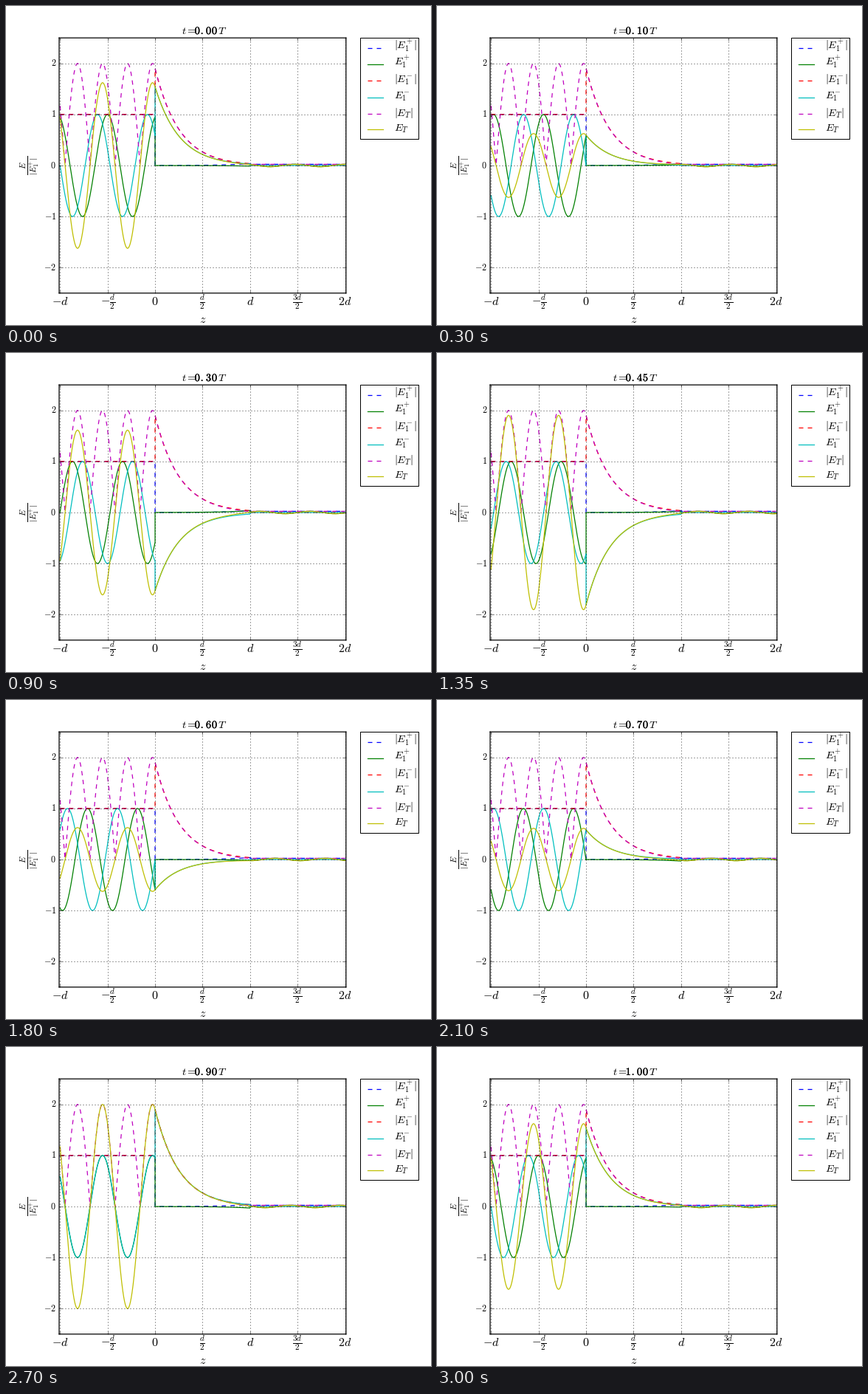
Recreate the animation shown at these times as a matplotlib script. Size 576 px wide and 432 px high, loop 3150 ms.

```python
import numpy as np
import matplotlib.pyplot as plt
from matplotlib.animation import FuncAnimation
from matplotlib.lines import Line2D
from matplotlib.patches import Rectangle
from matplotlib.patheffects import withStroke

plt.style.use("classic")
plt.rcParams.update({
    "figure.dpi": 72,
    "figure.facecolor": "white",
    "mathtext.fontset": "cm",
    "lines.linewidth": 1.25,
    "grid.linewidth": 0.75,
})

W, H = 576, 432
FRAMES, INTERVAL = 21, 150

# Lengths in units of the gap width d
K = 3.8 * np.pi          # wavenumber outside the gap
Q = 0.3287 * K           # decay constant inside the gap


def solve():
    """Phasors of both partial waves over all three regions."""
    t = np.exp(-0.2j * np.pi)
    down = t / 2 * (1 + 1j * K / Q) * np.exp(Q)
    up = t / 2 * (1 - 1j * K / Q) * np.exp(-Q)
    skew = 1j * Q / K * (down - up)
    inc = (down + up - skew) / 2
    ref = (down + up + skew) / 2

    z1, z2, z3 = (np.linspace(a, a + 1, 1000) for a in (-1, 0, 1))
    plus = np.concatenate([inc * np.exp(-1j * K * z1),
                           up * np.exp(Q * z2),
                           t * np.exp(-1j * K * (z3 - 1))])
    minus = np.concatenate([ref * np.exp(1j * K * z1),
                            down * np.exp(-Q * z2),
                            0 * z3])
    return np.concatenate([z1, z2, z3]), plus / abs(inc), minus / abs(inc)


z, plus, minus = solve()
waves = [plus, minus, plus + minus]

fig = plt.figure(figsize=(W / 72, H / 72))
ax = fig.add_axes([0.125, 0.1, 0.675, 0.8])
ax.set_xlim(-1.01, 2.01)
ax.set_ylim(-2.5, 2.5)
ax.grid(True)

ax.set_xticks(np.arange(-1, 2.1, 0.5))
ax.set_xticklabels([r"$-d$", r"$-\frac{d}{2}$", "$0$", r"$\frac{d}{2}$",
                    "$d$", r"$\frac{3d}{2}$", "$2d$"],
                   fontsize=16, va="center")
ax.tick_params(axis="x", pad=11.5)
ax.set_yticks(range(-2, 3))
ax.set_yticklabels([f"${v}$" for v in range(-2, 3)], fontsize=12)
for spine in ax.spines.values():
    spine.set(snap=False, linewidth=1.25)


def label(x, y, s, size=14.4, **kw):
    """Text placed in pixels from the top left corner."""
    return fig.text(x / W, 1 - y / H, s, fontsize=size, **kw)


def field(sign):
    """Field symbol with the sign set above the index."""
    return rf"E_1^{{\hspace{{-0.18}}{sign}}}"


label(267, 424.5, "$z$", 16, ha="center", va="center")
label(32.5, 216, rf"$\frac{{E}}{{|{field('+')}|}}$", 16,
      ha="center", va="center", rotation=90)

# Title: the time value is bold and slightly spaced
label(237.5, 38, "$t=$")
label(287, 38, "$T$")
clock = label(271.5, 38, "", ha="center", va="baseline",
              path_effects=[withStroke(linewidth=0.3, foreground="black")])

# Legend
fig.add_artist(Rectangle((480.24 / W, 1 - 180 / H), 79 / W, 136.8 / H,
                         fc="white", ec="black", lw=1))
names = [f"|{field('+')}|", field("+"), f"|{field('-')}|", field("-"),
         "|E_T|", "E_T"]
rows = [56.5, 78.5, 100.5, 123.5, 145.5, 166.5]
bases = [58.5, 80.5, 103.5, 125.5, 149, 169.3]
styles = [("b", "--"), ("g", "-"), ("r", "--"),
          ("c", "-"), ("m", "--"), ("y", "-")]
lines = []
for name, row, base, (color, ls) in zip(names, rows, bases, styles):
    fig.add_artist(Line2D([490.3 / W, 510.5 / W], [1 - row / H] * 2,
                          color=color, ls=ls))
    label(525.8, base, f"${name}$", va="baseline")
    lines += ax.plot(z, 0 * z, color=color, ls=ls)

for line, wave in zip(lines[::2], waves):
    line.set_ydata(abs(wave))


def update(i):
    t = i / (FRAMES - 1)
    turn = np.exp(2j * np.pi * t)
    for line, wave in zip(lines[1::2], waves):
        line.set_ydata((wave * turn).real)
    digits = r"\hspace{0.06}".join(f"{t:.2f}")
    clock.set_text(rf"$\mathbf{{{digits}}}$")
    return lines + [clock]


anim = FuncAnimation(fig, update, frames=FRAMES, interval=INTERVAL,
                     repeat=True, repeat_delay=0, blit=False)
plt.show()
```
